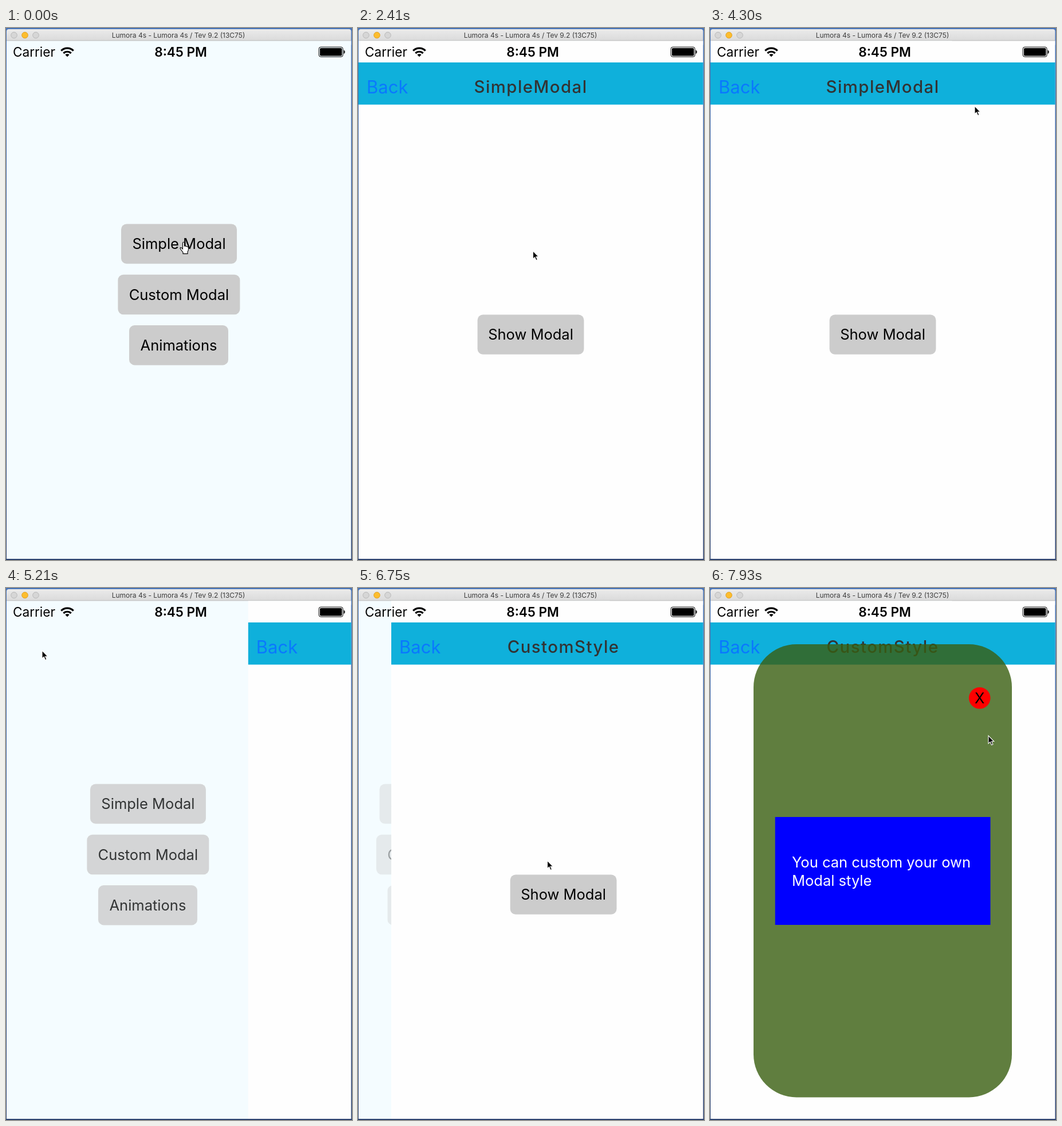
Animation, 604 px wide and 927 px high, one loop 8000 ms. Source, as an HTML page:

```html
<!DOCTYPE html>
<html lang="en">
<head>
<meta charset="utf-8">
<title>Modal demo</title>
<style>
  html, body { margin: 0; width: 100%; height: 100%; overflow: hidden; }
  svg { display: block; width: 100vw; height: 100vh; }
  text { font: 25.5px Inter, sans-serif; font-optical-sizing: none; text-anchor: middle; }
  .start { text-anchor: start; }
  .status { font-size: 22.6px; }
  .bold { font-weight: 600; }
  .caption { font-size: 12px; fill: #3c3c3c; }
  .back { font-size: 31px; fill: #0a78ff; }
  .title { font-size: 29.3px; font-weight: 500; letter-spacing: 1.5px; fill: #333; }
  .light { fill: #fff; }
</style>
</head>
<body>
<svg viewBox="0 0 604 927">
  <defs>
    <linearGradient id="bar" x2="0" y2="1">
      <stop stop-color="#ebebeb"/><stop offset="1" stop-color="#d2d2d2"/>
    </linearGradient>
    <linearGradient id="desk" x2="0" y2="1">
      <stop stop-color="#4673b8"/><stop offset="1" stop-color="#2c4270"/>
    </linearGradient>
    <clipPath id="screen"><rect x="1" y="22.5" width="601.5" height="902.5"/></clipPath>
  </defs>
  <rect width="604" height="927" fill="url(#desk)"/>
  <rect x="1" y="2" width="601.5" height="30" rx="4" fill="url(#bar)"/>
  <rect x="1" y="21.5" width="601.5" height="1" fill="#b4b4b4"/>
  <g stroke="#b9b9b9" fill="#d6d6d6">
    <circle cx="14" cy="12.5" r="5.3"/>
    <circle cx="33" cy="12.5" r="5.3" fill="#fdbd2e" stroke="#dfa023"/>
    <circle cx="52" cy="12.5" r="5.3"/>
  </g>
  <text class="caption" x="301" y="17">Lumora 4s - Lumora 4s / Tev 9.2 (13C75)</text>

  <g clip-path="url(#screen)">
    <g id="home">
      <rect x="1" y="22" width="602" height="904" fill="#f4fcff"/>
      <g id="menu"></g>
    </g>
    <g id="page">
      <rect x="1" y="22" width="602" height="904" fill="#fefefe"/>
      <rect x="1" y="60" width="602" height="73.5" fill="#0fb0db"/>
      <text class="back start" x="15" y="114">Back</text>
      <text class="title" id="title" x="301.5" y="112.5"></text>
      <g id="show"></g>
    </g>
    <g id="simple">
      <rect x="1" y="22" width="602" height="904" fill-opacity=".2"/>
      <rect x="113.7" y="380" width="375.8" height="188" fill="#00f"/>
      <text class="light" x="301.5" y="483">Amazing!</text>
      <g id="close"></g>
    </g>
    <g id="custom">
      <rect x="76" y="98" width="451" height="789.5" rx="75" fill="rgb(57,94,16)" fill-opacity=".8"/>
      <rect x="113.7" y="399" width="375.8" height="188" fill="#00f"/>
      <text class="light start" x="143" y="487">You can custom your own</text>
      <text class="light start" x="143" y="519">Modal style</text>
      <circle cx="470.7" cy="191.8" r="18.8" fill="#f00"/>
      <text x="470.7" y="201">X</text>
    </g>
  </g>

  <text class="status start" x="12" y="50">Carrier</text>
  <text class="status bold" x="305" y="50">8:45 PM</text>
  <g fill="none" stroke="#000" stroke-width="3.2">
    <path d="M96.3 39.6a15 15 0 0 1 21.4 0M100.4 44a9.3 9.3 0 0 1 13.2 0"/>
    <path d="M107 50.3l-3.6-3.7a5.2 5.2 0 0 1 7.2 0z" fill="#000" stroke="none"/>
  </g>
  <rect x="546.2" y="33.2" width="42" height="17" rx="3.2" fill="none" stroke="#000"/>
  <rect x="548" y="35" width="38.4" height="13.4" rx="1.6"/>
  <path d="M589.6 38.6q2.2.6 2.2 3.2t-2.2 3.2z"/>

  <path id="arrow" d="M1 1.2V15l3.2-3 2.3 5.4 2.4-1-2.3-5.2h4.2z" stroke="#fff" stroke-width="1.1"/>
  <path id="hand" transform="translate(303 372)" fill="#fff" stroke="#000" stroke-width="1.1"
    d="M5.4 13V3Q5.4 1 6.9 1T8.4 3V8q1.5-1 2.5.5 1.5-.8 2.3.6 2-.5 2.2 1.4V14q0 2-1.4 4v3.4H6V19L1.5 13Q.4 11 2 10.6q1.6 0 3.4 2.4z"/>
</svg>
<script>
const LOOP = 8000, WIDTH = 602, TICK = 89;
const $ = id => document.getElementById(id);

function button(parent, label, left, top, width, fill = '#ccc') {
  $(parent).insertAdjacentHTML('beforeend',
    `<rect x="${left}" y="${top}" width="${width}" height="69.4" rx="9.5" fill="${fill}"/>
     <text x="${left + width / 2}" y="${top + 44}">${label}</text>`);
}
button('menu', 'Simple Modal', 201, 341.4, 202);
button('menu', 'Custom Modal', 195.4, 429.8, 213);
button('menu', 'Animations', 215, 518, 173);
button('show', 'Show Modal', 208.6, 499.4, 185.8);
button('close', 'Close', 458.4, 97.8, 106.4, '#f00');

// Bursts of motion: start time and number of held steps.
const bursts = [[0, 1], [740, 1], [1770, 5], [2410, 5], [3050, 10], [3940, 1],
  [4300, 7], [5120, 10], [6010, 1], [6570, 9], [7380, 1], [7660, 4]];

// Pointer stops: time, x, y.
const stops = [[0, 306, 371], [2320, 306, 371], [2780, 290.5, 535], [3050, 290.5, 535],
  [3850, 487, 138], [3940, 470.5, 131.5], [4210, 470.5, 131.5], [4300, 461, 135],
  [4840, 62, 108], [5390, 62, 108], [5920, 338, 474], [6010, 329.5, 474],
  [6930, 329.5, 474], [7290, 339, 531], [7380, 337.5, 534], [7600, 337.5, 534],
  [7930, 485, 256]];

function hold(t) {
  const [start, steps] = bursts.findLast(b => b[0] <= t);
  const n = Math.floor((t - start) / TICK + 0.02);
  return start + TICK * Math.min(n, steps - 1);
}

// Navigation spring: tension 200, friction 26, initial velocity 1.5.
function spring(t, start) {
  if (t < start) return 0;
  const s = (t - start) / 1000 + 0.065;
  if (s > 0.41) return 1;
  const w = Math.sqrt(31);
  return 1 - Math.exp(-13 * s) * (Math.cos(w * s) + 11.5 / w * Math.sin(w * s));
}

function pointer(t) {
  const i = stops.findIndex(s => s[0] > t);
  if (i < 0) return stops[stops.length - 1].slice(1);
  const [t0, x0, y0] = stops[i - 1], [t1, x1, y1] = stops[i];
  const u = (t - t0) / (t1 - t0), e = u * u * (3 - 2 * u);
  return [x0 + (x1 - x0) * e, y0 + (y1 - y0) * e];
}

const move = (id, x, y = 0) => $(id).setAttribute('transform', `translate(${x} ${y})`);
const show = (id, on) => $(id).setAttribute('display', on ? 'inline' : 'none');

function draw(time) {
  const t = hold(time);
  const p = spring(t, 1770) - spring(t, 5120) + spring(t, 6570);
  move('home', -0.3 * WIDTH * p);
  $('menu').setAttribute('opacity', 1 - 0.7 * p);
  move('page', WIDTH * (1 - p));
  $('title').textContent = t < 6500 ? 'SimpleModal' : 'CustomStyle';
  show('simple', t >= 3050 && t < 4300);
  show('custom', t >= 7660);
  show('hand', t < 740);
  show('arrow', t >= 740);
  move('arrow', ...pointer(t));
}

function frame() {
  draw(performance.now() % LOOP);
  requestAnimationFrame(frame);
}
frame();
</script>
</body>
</html>
```
